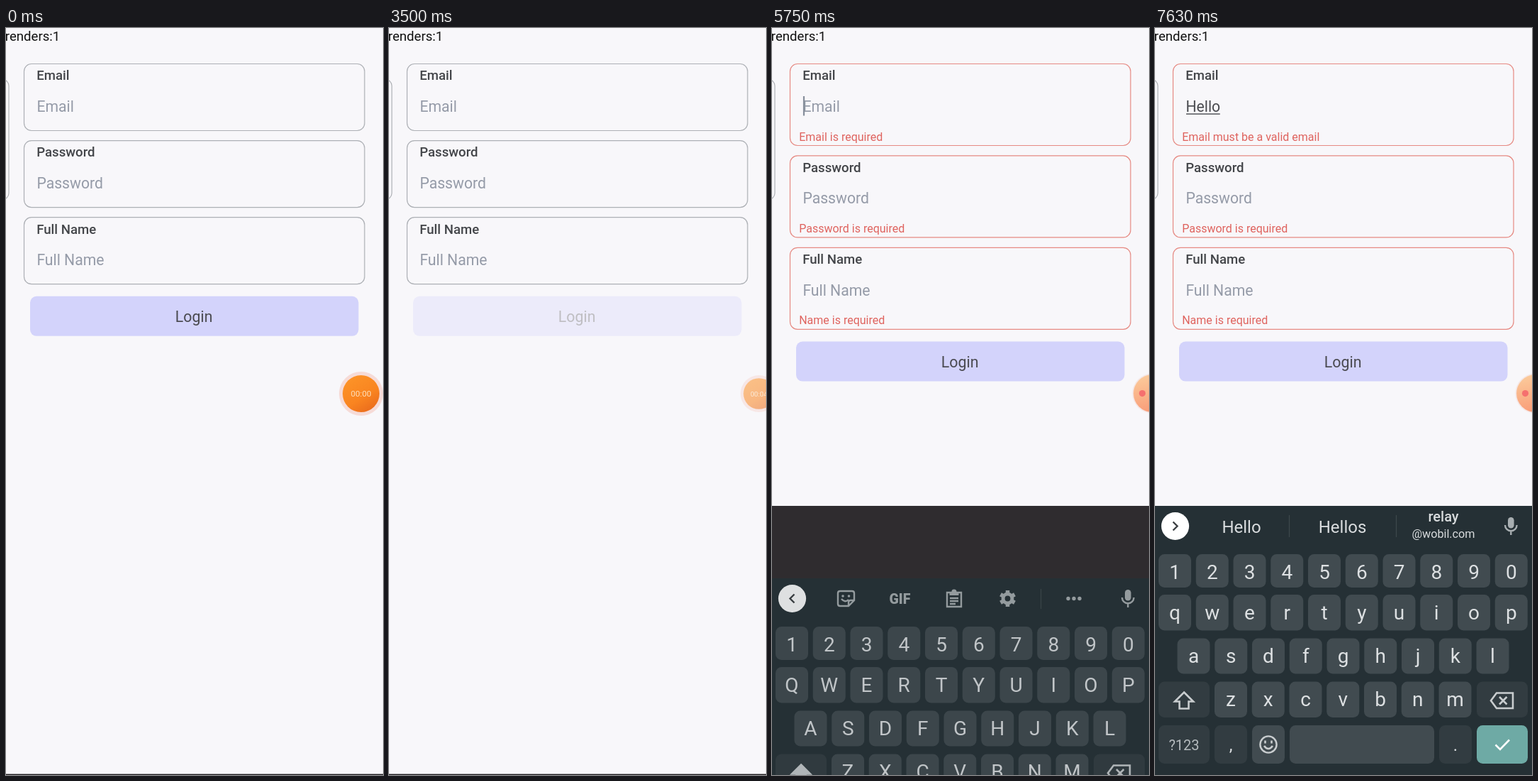
These frames come from a looping animation (532x1052 px, 8000 ms). An HTML page:

```html
<!DOCTYPE html>
<html lang="en">
<head>
<meta charset="utf-8">
<title>Login form</title>
<style>
html, body { margin: 0; width: 100%; height: 100%; overflow: hidden; background: #f8f7fa; }
svg { display: block; width: 532px; height: 1052px; font-family: Roboto, "Noto Sans", sans-serif; }
.mid { text-anchor: middle; }
.box { fill: none; stroke: #adb0b5; stroke-width: 1.2; }
.box.bad { stroke: #e68a83; }
.label { font-size: 18.6px; font-weight: 500; fill: #434549; }
.input { font-size: 21.2px; fill: #959ba8; }
.input.typed { fill: #4a4b50; }
.error { font-size: 16px; fill: #df635e; }
.login { font-size: 21.4px; fill: #4a4a50; }
.key { fill: #414b50; }
.key.dark { fill: #323c41; }
.cap { font-size: 28px; fill: #dde0e2; }
.word { font-size: 24px; fill: #d9dcde; }
.line { fill: none; stroke: #c9cdcf; stroke-width: 2.6; }
.tool { fill: none; stroke: #a8aeb1; stroke-width: 2.4; }
.solid { fill: #a8aeb1; }
.sep { stroke: #3d484d; stroke-width: 1.2; }
</style>
</head>
<body>
<svg id="stage" viewBox="0 0 532 1052">
  <defs>
    <linearGradient id="orange" x1=".2" y1="0" x2=".8" y2="1">
      <stop offset="0" stop-color="#fd9428"/><stop offset=".6" stop-color="#f98420"/><stop offset="1" stop-color="#e96a1c"/>
    </linearGradient>
    <linearGradient id="peach" x1=".3" y1="0" x2=".5" y2="1">
      <stop offset="0" stop-color="#fbcb9b"/><stop offset="1" stop-color="#f99c78"/>
    </linearGradient>
  </defs>
  <rect width="532" height="1052" fill="#f8f7fa"/>
  <rect y="1050.6" width="532" height="1.4" fill="#1f1d20"/>
  <text x="-1.2" y="18.4" font-size="18.6" fill="#111">renders:1</text>
  <rect class="box" x="-60" y="72.5" width="64" height="169" rx="9"/>

  <g id="fields"></g>
  <rect id="underline" x="44" y="120.4" height="1.4" fill="#4a4b50"/>
  <rect id="cursor" y="96" width="2.2" height="27.5" fill="#868e9b"/>
  <g id="login">
    <rect x="34" width="463.5" height="56" rx="9" fill="#d3d3fb"/>
    <text class="login mid" x="265.2" y="36.3">Login</text>
  </g>

  <g id="ball">
    <circle r="31" fill="#f3b3a4" opacity=".42"/>
    <circle r="26" fill="url(#orange)"/>
    <text id="timer" class="mid" y="4.2" font-size="11.6" fill="#fde0bd"></text>
  </g>
  <g id="dot">
    <circle r="28" fill="#e9b9a8" opacity=".25"/>
    <circle r="26.4" fill="url(#peach)"/>
    <circle cx="-14" r="4.6" fill="#f5706f"/>
  </g>

  <g id="keyboard">
    <rect y="673" width="532" height="379" fill="#2f2c2f"/>
    <g id="panel">
      <rect y="673" width="532" height="379" fill="#253035"/>
      <g id="keys">
        <circle cx="28.5" cy="701.5" r="19.6" fill="#fff"/>
        <path id="chevron" fill="none" stroke="#3c4043" stroke-width="2.4"/>
        <g class="solid">
          <rect x="498" y="689" width="8.6" height="15.5" rx="4.3"/>
          <path class="tool" d="M494 700a8.3 8.3 0 0 0 16.6 0M502.3 708.5v5.5"/>
        </g>
        <g id="tools">
          <path class="tool" d="M96 691h17q3 0 3 3v10l-8 8h-12q-3 0 -3-3v-15q0-3 3-3zM116 704h-5q-3 0-3 3v5M98 702q5 6 10 1"/>
          <circle class="solid" cx="100" cy="698" r="1.8"/><circle class="solid" cx="108.500" cy="698" r="1.800"/>
          <text class="solid mid" x="180.500" y="708.600" font-size="19.500" font-weight="900">GIF</text>
          <path class="tool" d="M247 693h20v20h-20zM251 701h12M251 705h12M251 709h8"/>
          <path class="solid" d="M250.500 692h3a3.500 3.500 0 0 1 7 0h3v5h-13z"/>
          <g transform="translate(332.500 701.500)">
            <circle class="tool" r="6.400" style="stroke-width:5"/>
            <path id="teeth" class="tool" style="stroke-width:5.500"/>
          </g>
          <path class="sep" d="M379.500 688v28"/>
          <g class="solid"><circle cx="418" cy="701.500" r="2.700"/><circle cx="426" cy="701.500" r="2.700"/><circle cx="434" cy="701.500" r="2.700"/></g>
        </g>
        <g id="words">
          <path class="sep" d="M189.500 686v31M340.500 686v31"/>
          <text class="word mid" x="122" y="711"></text>
          <text class="word mid" x="264.500" y="711"></text>
          <text class="word mid" x="407" y="711"></text>
          <g id="address" class="mid" fill="#d9dcde">
            <text x="407" y="695" font-size="20" font-weight="500">relay</text>
            <text x="407" y="718" font-size="16.200">@wobil.com</text>
          </g>
        </g>
      </g>
    </g>
  </g>
</svg>
<script>
const $ = id => document.getElementById(id);
const LOOP = 8000, PITCH = 52.75;

function add(parent, tag, attrs, text = "") {
  const el = document.createElementNS("http://www.w3.org/2000/svg", tag);
  for (const k in attrs) el.setAttribute(k, attrs[k]);
  el.textContent = text;
  return parent.appendChild(el);
}
const show = (el, on) => el.setAttribute("visibility", on ? "inherit" : "hidden");
const move = (el, x, y, s = 1) => el.setAttribute("transform", `translate(${x} ${y}) scale(${s})`);

const fields = ["Email", "Password", "Full Name"].map(name => {
  const g = add($("fields"), "g", {});
  return {
    g, name,
    box: add(g, "rect", { class: "box", x: 25.5, y: 0.5, width: 480.5, rx: 10.5 }),
    label: add(g, "text", { class: "label", x: 43.2, y: 23.4 }, name),
    input: add(g, "text", { class: "input", x: 43.4, y: 68 }, name),
    error: add(g, "text", { class: "error", x: 38.2, y: 108.6 }, name.replace("Full ", "") + " is required")
  };
});

// Keyboard
const keys = $("keys"), letters = [];
const key = (x, y, w, h, look = "") =>
  add(keys, "rect", { class: "key " + look, x, y, width: w, height: h, rx: 8.5 });
const cap = (x, y, text) => add(keys, "text", { class: "cap mid", x, y }, text);

[["1234567890", 5, 741, 47], ["qwertyuiop", 5, 798, 50.5],
 ["asdfghjkl", 31.5, 859.5, 50], ["zxcvbnm", 84, 920.5, 50.5]].forEach(([row, x0, y, h], r) => {
  [...row].forEach((ch, i) => {
    const x = x0 + i * PITCH;
    key(x, y, 46, h);
    const el = cap(x + 23, y + h / 2 + (r ? 9.4 : 11.3), ch);
    if (r) letters.push([el, ch]);
  });
});
key(5, 920.5, 72, 50.5, "dark");
key(454, 920.5, 72, 50.5, "dark");
key(5, 982, 72, 54, "dark");
key(84, 982, 46, 54, "dark");
key(137, 982, 46, 54);
key(190, 982, 204, 54);
key(401, 982, 46, 54, "dark");
key(454, 982, 72, 54).style.fill = "#6eaaa5";
const shift = add(keys, "path", { class: "line", d: "M41 935.500L54 948.500H47.500V958.500H34.500V948.500H28Z" });
add(keys, "path", { class: "line", d: "M482 936.500H505V958H482L474 947.200ZM486 942l10.500 10.500M496.500 942l-10.500 10.500" });
add(keys, "circle", { class: "line", cx: 160, cy: 1009, r: 11.6, style: "stroke-width:2.4" });
add(keys, "path", { class: "line", d: "M154 1011q6 8 12 0M155.500 1003.500v4M164.500 1003.500v4" });
add(keys, "path", { class: "line", d: "M480.500 1009.500l6.500 6.500 13-13.500", style: "stroke:#fff" });
add(keys, "text", { class: "mid", x: 41, y: 1016.5, "font-size": 20, fill: "#b4babd" }, "?123");
cap(107, 1018, ",").style.fontSize = "24px";
cap(424, 1018, ".").style.fontSize = "24px";

let teeth = "";
for (let i = 0; i < 6; i++) {
  const a = Math.PI / 6 + i * Math.PI / 3, c = Math.cos(a), s = Math.sin(a);
  teeth += `M${7 * c} ${7 * s}L${11.5 * c} ${11.5 * s}`;
}
$("teeth").setAttribute("d", teeth);

// [time, typed text, suggestions]
const typing = [
  [6250, "H", ["H", "Hi", "Hey"]],
  [6500, "He", ["He", "Hey", "Hello"]],
  [6630, "Hel", ["Hel", "Hello", "Help"]],
  [6880, "Hell", ["Hell", "Hello", "Hells"]],
  [7000, "Hello", ["Hello", "Hellos", ""]]
];
const words = $("words").querySelectorAll(".word");
const between = (t, a, b) => t >= a && t < b;

function drawForm(t) {
  const bad = t >= 3880;
  fields.forEach((f, i) => {
    move(f.g, 0, 50 + i * (bad ? 129.4 : 108.1));
    f.box.setAttribute("height", bad ? 115 : 94);
    f.box.classList.toggle("bad", bad);
    show(f.error, bad);
  });
  move($("login"), 0, bad ? 441.6 : 377.8);
  $("login").setAttribute("opacity", between(t, 3500, 4000) ? 0.32 : between(t, 4000, 4130) ? 0.65 : 1);

  const [, text, list] = typing.filter(s => t >= s[0]).pop() || [0, "", []];
  const { input, error } = fields[0];
  input.textContent = text || "Email";
  input.classList.toggle("typed", !!text);
  error.textContent = text ? "Email must be a valid email" : "Email is required";
  const width = text ? input.getComputedTextLength() : 0;
  $("underline").setAttribute("width", Math.max(0, width - 1));
  $("cursor").setAttribute("x", 43.9 + Math.max(0, width - 1.4));
  show($("cursor"), between(t, 5380, 5880) || between(t, 6250, 7630));
  drawKeyboard(t, text, list);
}

function drawKeyboard(t, text, list) {
  const rising = t < 5880;
  show($("keyboard"), t >= 5750);
  move($("panel"), 0, rising ? 102 : 0);
  keys.setAttribute("opacity", rising ? 0.85 : 1);
  show($("tools"), !text);
  show($("words"), !!text);
  show($("address"), text === "Hello");
  words.forEach((el, i) => el.textContent = list[i] || "");
  letters.forEach(([el, ch]) => el.textContent = text ? ch : ch.toUpperCase());
  shift.style.fill = text ? "none" : "#c9cdcf";
  $("chevron").setAttribute("d", text ? "M25.500 695.500l6 6-6 6" : "M31.500 695.500l-6 6 6 6");
}

function drawBall(t) {
  const p = t < 630 ? 0 : Math.min(1, (Math.floor((t - 630) / 125) + 1) / 5);
  move($("ball"), 501 + 21 * p, 515, 1 - 0.16 * p);
  $("ball").setAttribute("opacity", 1 - 0.45 * p);
  $("timer").textContent = "00:0" + [250, 1380, 2380, 3500].filter(s => t >= s).length;
  show($("ball"), t < 4500);
  show($("dot"), t >= 4500);
  move($("dot"), t < 4630 ? 530 : 536.5, 514.6);
}

let start;
function tick(now) {
  start ??= now;
  const t = (now - start) % LOOP;
  drawForm(t);
  drawBall(t);
  requestAnimationFrame(tick);
}
requestAnimationFrame(tick);
</script>
</body>
</html>
```
